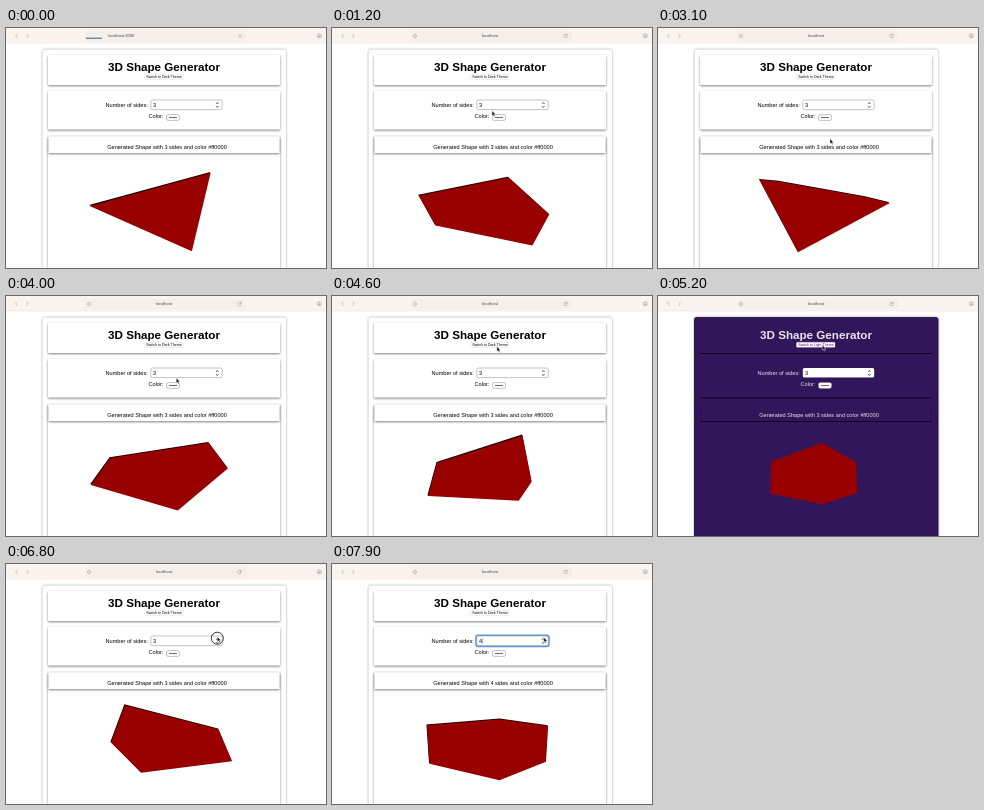
An HTML page that plays this animation: 320x240 px, repeating every 8 s.

```html
<!DOCTYPE html>
<html lang="en">
<head>
<meta charset="utf-8">
<title>3D Shape Generator</title>
<style>
  html, body { margin: 0; width: 100%; height: 100%; overflow: hidden; background: #fff; }
  svg { display: block; width: 100vw; height: 100vh; }
  text { font-family: "Liberation Sans", Arial, sans-serif; font-size: 5.6px; fill: #000; }
  .mid { text-anchor: middle; }
  .bar text { font-size: 4.1px; fill: #444; }
  .bar path, .bar circle { fill: none; stroke: #888; stroke-width: .5; }
  .panel { fill: #fff; filter: drop-shadow(0 .5px 1px rgba(0, 0, 0, .4)); }
  .card { fill: #fff; filter: drop-shadow(0 1px .8px rgba(0, 0, 0, .5)); }
  .field { fill: #fff; stroke: #888; stroke-width: .5; }
  .small { font-size: 3.6px; }
  .dark .panel { fill: #32165b; stroke: #1d0c38; stroke-width: .8; }
  .dark .card { fill: #32165b; filter: drop-shadow(0 1px .4px rgba(0, 0, 0, .75)); }
  .dark .label { fill: #e9e3e6; }
  .dark .field { stroke: none; filter: drop-shadow(.3px .5px .3px #000); }
  .dark #button { fill: #fff; stroke: #e3c4e6; }
  .dark #buttonText { fill: #4b1a5c; }
  .dark #edge { display: none; }
</style>
</head>
<body>
<svg viewBox="0 0 320 240" preserveAspectRatio="none">
  <rect width="320" height="240" fill="#fff"/>
  <g class="bar">
    <rect width="320" height="15" fill="#faf4f1"/>
    <rect y="14.7" width="320" height=".5" fill="#e6dfdb"/>
    <rect x="79" y="3" width="161" height="10" rx="2" fill="#f5efec"/>
    <path d="M11.5 5.8l-1.8 2 1.8 2M20.5 5.8l1.8 2-1.8 2"/>
    <circle cx="313.3" cy="7.8" r="2.1"/>
    <path d="M313.3 6.5v2.4M312.3 8l1 1 1-1"/>
    <g id="loading">
      <rect x="80" y="9.7" width="16" height="1" fill="#38558f"/>
      <text x="102" y="9.4">localhost:3000</text>
      <path d="M232.5 6.3l3 3M235.5 6.3l-3 3"/>
    </g>
    <g id="loaded">
      <circle cx="83" cy="8" r="1.5"/>
      <text class="mid" x="158" y="9.4">localhost</text>
      <path d="M235 7.2a1.7 1.7 0 1 0 .2 1.2M235.2 5.9v1.4h-1.4"/>
    </g>
  </g>
  <g id="page">
    <rect class="panel" x="36.5" y="21.5" width="243.5" height="230" rx="2"/>
    <rect class="card" x="42" y="27" width="232" height="30" rx="1"/>
    <rect class="card" x="42" y="63" width="232" height="38.5" rx="1"/>
    <rect class="card" x="42" y="108" width="232" height="140" rx="1"/>
    <rect class="card" x="42.5" y="108.5" width="231" height="16.5"/>

    <text class="label mid" x="158" y="43" style="font-size:11.65px;font-weight:bold">3D Shape Generator</text>
    <rect id="button" x="138.5" y="46.3" width="38.5" height="5" rx="1" fill="#fff" stroke="#ccc" stroke-width=".4"/>
    <text id="buttonText" class="mid small" x="158" y="50"></text>

    <text class="label" x="99.5" y="79">Number of sides:</text>
    <rect id="focus" x="144" y="71.4" width="73" height="11" rx="2.2" fill="none" stroke="#5b97e0" stroke-width="1.6"/>
    <rect class="field" x="144.8" y="72" width="71.4" height="9.6" rx="1.6"/>
    <text id="value" x="147" y="79"></text>
    <rect id="caret" x="150.6" y="74" width=".5" height="6" fill="#4a7fd0"/>
    <path d="M210 76l1.3-1.6 1.3 1.6M210 78l1.3 1.6 1.3-1.6" fill="none" stroke="#333" stroke-width=".7"/>
    <text class="label" x="142.5" y="90">Color:</text>
    <rect class="field" x="160.5" y="86.6" width="13" height="5.8" rx="1.6"/>
    <rect x="163" y="89.1" width="8" height=".8" fill="#444"/>
    <text id="caption" class="label mid" x="161" y="120.8"></text>

    <polygon id="edge" fill="#000" transform="translate(-.5 -.8)"/>
    <polygon id="solid" fill="#980000"/>
  </g>
  <g id="pointer">
    <circle id="ring" cy="-.8" r="6" fill="none" stroke="#222" stroke-width=".9"/>
    <path d="M0 -2.2v5l1.2-1.1.9 2 .9-.4-.9-1.9h1.6z" fill="#111" stroke="#fff" stroke-width=".4"/>
  </g>
</svg>
<script>
const LOOP = 8, STEP = 0.1;
const RELOAD = 0.1, DARK_ON = 5, DARK_OFF = 5.7, FOCUS = 7.3, FOUR = 7.6;
const CENTER = { x: 158, y: 180.6 }, FOCAL = { x: 149, y: 93 }, DISTANCE = 2.5;

// Rows of [seconds, value, ...], joined by straight lines.
const spinKeys = [[RELOAD, .02], [5.2, 3.08], [6.3, 5.56], [FOUR, 5.95]];
const pointerKeys = [
  [.5, 172, 36], [.9, 165, 50], [1.2, 160, 85], [1.8, 163, 85], [2.7, 172, 94],
  [3.1, 172, 113], [3.6, 171, 95], [4, 170.3, 84.3], [4.5, 165, 53], [5.2, 164.3, 51.3],
  [5.8, 164.3, 51.3], [6.3, 206, 72], [6.8, 211.3, 75], [7.9, 211.7, 75.5]
];

const el = id => document.getElementById(id);
const show = (id, on) => el(id).setAttribute("visibility", on ? "visible" : "hidden");

function sample(keys, t) {
  const next = keys.findIndex(k => k[0] >= t);
  if (next === 0) return keys[0].slice(1);
  if (next < 0) return keys[keys.length - 1].slice(1);
  const a = keys[next - 1], b = keys[next];
  const p = (t - a[0]) / (b[0] - a[0]);
  return a.slice(1).map((v, i) => v + (b[i + 1] - v) * p);
}

function spinAt(t) {
  if (t < RELOAD) return 4.83 + 0.6 * t;
  if (t >= FOUR) return 0.1 + 0.3 * (t - 7.9);
  return sample(spinKeys, t)[0];
}

// Prism of unit radius and height, turned equally about y and then x.
function project(sides, spin) {
  const sin = Math.sin(spin), cos = Math.cos(spin), points = [];
  for (let i = 0; i < sides; i++) {
    const angle = spin + i * 2 * Math.PI / sides;
    for (const h of [-0.5, 0.5]) {
      const y = h * cos - Math.cos(angle) * sin;
      const depth = DISTANCE - h * sin - Math.cos(angle) * cos;
      points.push([
        CENTER.x + FOCAL.x * Math.sin(angle) / depth,
        CENTER.y - FOCAL.y * y / depth
      ]);
    }
  }
  return points;
}

function hull(points) {
  const cross = (o, a, b) => (a[0] - o[0]) * (b[1] - o[1]) - (a[1] - o[1]) * (b[0] - o[0]);
  const chain = list => {
    const out = [];
    for (const p of list) {
      while (out.length > 1 && cross(out[out.length - 2], out[out.length - 1], p) <= 0) out.pop();
      out.push(p);
    }
    return out.slice(0, -1);
  };
  const sorted = points.sort((a, b) => a[0] - b[0] || a[1] - b[1]);
  return chain(sorted).concat(chain([...sorted].reverse()));
}

function render(t) {
  const sides = t >= FOUR ? 4 : 3;
  const dark = t >= DARK_ON && t < DARK_OFF;
  const loaded = t >= RELOAD + 0.1;

  show("loading", !loaded);
  show("loaded", loaded);
  el("page").setAttribute("class", dark ? "dark" : "");
  el("buttonText").textContent = `Switch to ${dark ? "Light" : "Dark"} Theme`;
  el("value").textContent = sides;
  el("caption").textContent = `Generated Shape with ${sides} sides and color #ff0000`;
  show("focus", t >= FOCUS);
  show("caret", t >= FOCUS);

  const outline = hull(project(sides, spinAt(t)))
    .map(p => p.map(v => v.toFixed(2)).join()).join(" ");
  el("solid").setAttribute("points", outline);
  el("edge").setAttribute("points", outline);

  const [x, y] = sample(pointerKeys, t);
  el("pointer").setAttribute("transform", `translate(${x} ${y})`);
  show("pointer", t >= 0.5);
  show("ring", t >= 6.6 && t < 7.1);
}

const start = performance.now();
function tick() {
  const elapsed = (performance.now() - start) / 1000 % LOOP;
  render(Math.floor(elapsed / STEP + 1e-6) * STEP + 1e-6);
  requestAnimationFrame(tick);
}
tick();
</script>
</body>
</html>
```
